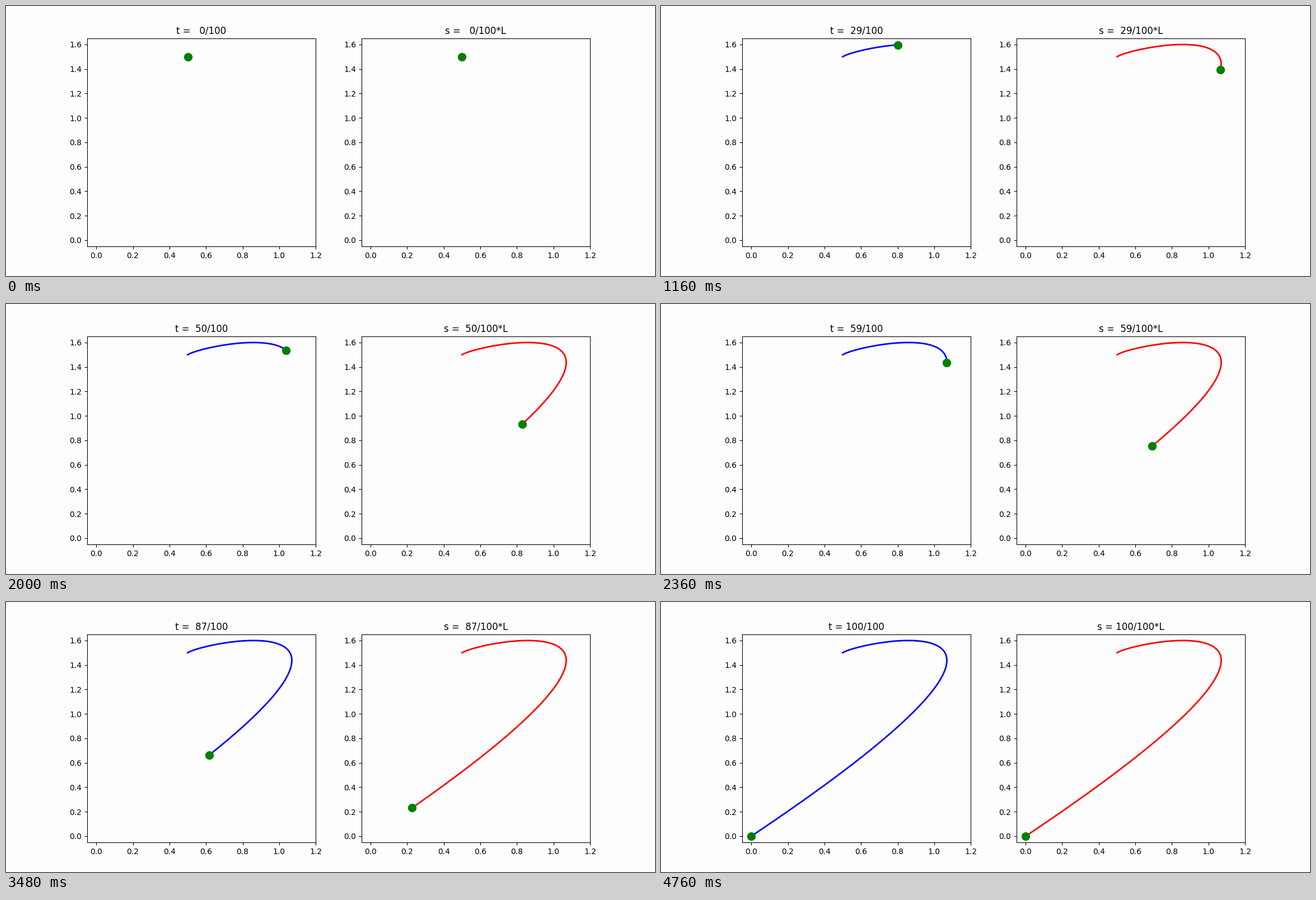
Write a matplotlib script that moves like this. It is 1159 px wide and 483 px high and loops after 4800 ms.

```python
import numpy as np
import matplotlib.pyplot as plt
from matplotlib.animation import FuncAnimation

W, H, DPI = 1159, 483, 100
FRAMES, INTERVAL, STEPS = 120, 40, 100
BACKGROUND = "#fdfdfd"


def curve(t):
    x = 0.5 + 0.3 * t + 3.9 * t**2 - 4.7 * t**3
    y = 1.5 + 0.3 * t + 0.9 * t**2 - 2.7 * t**3
    return x, y


# Cumulative arc length, scaled so the whole curve has length 1
grid = np.linspace(0, 1, 4001)
gx, gy = curve(grid)
arc = np.concatenate(([0], np.cumsum(np.hypot(np.diff(gx), np.diff(gy)))))
arc /= arc[-1]


def equal_speed(s):
    return np.interp(s, arc, grid)


class Panel:
    def __init__(self, ax, color, label, warp):
        ax.set(xlim=(-0.05, 1.2), ylim=(-0.05, 1.65), facecolor=BACKGROUND)
        self.label = label
        self.warp = warp
        self.title = ax.set_title(label.format(0))
        self.line, = ax.plot([], [], color=color, lw=2)
        self.dot, = ax.plot([], [], "o", color="green", ms=10, zorder=3)

    def update(self, step):
        end = self.warp(step / STEPS)
        x, y = curve(np.linspace(0, end, 4 * step + 1))
        self.line.set_data(x, y)
        self.line.set_visible(step > 0)
        self.dot.set_data(x[-1:], y[-1:])
        self.title.set_text(self.label.format(step))


fig, axes = plt.subplots(1, 2, figsize=(W / DPI, H / DPI), dpi=DPI,
                         facecolor=BACKGROUND)
panels = [
    Panel(axes[0], "blue", "t = {:3d}/100", lambda t: t),
    Panel(axes[1], "red", "s = {:3d}/100*L", equal_speed),
]


def draw(frame):
    # The finished curves rest until the loop ends
    step = min(frame, STEPS)
    for panel in panels:
        panel.update(step)


anim = FuncAnimation(fig, draw, frames=FRAMES, interval=INTERVAL,
                     init_func=lambda: draw(0), repeat=True, repeat_delay=0)
plt.show()
```
